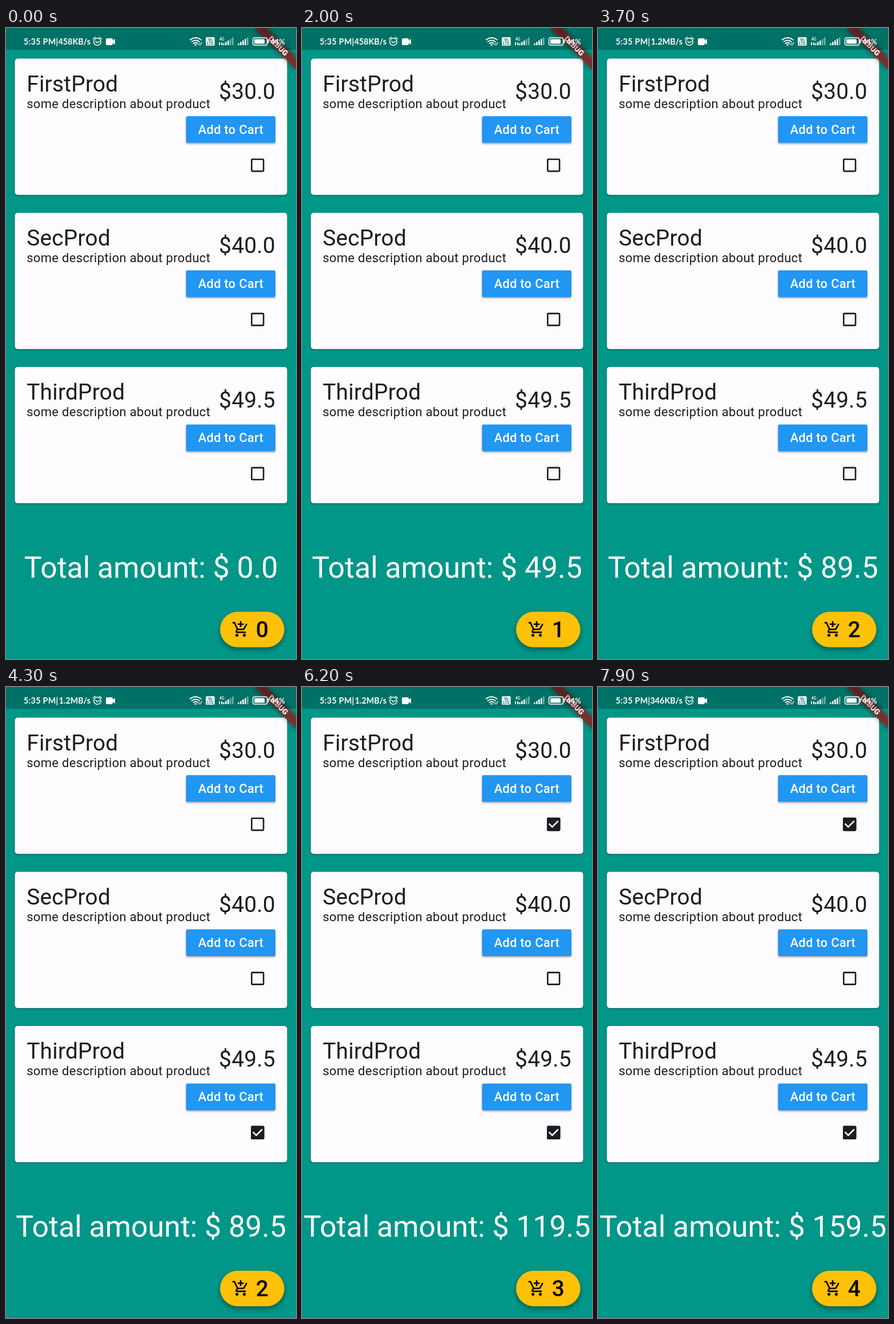
Recreate the animation shown at these times as an HTML page. Size 508 by 1102 pixels, loop 8000 ms.

```html
<!DOCTYPE html>
<html lang="en">
<head>
<meta charset="utf-8">
<title>Shopping cart</title>
<style>
  html, body { margin: 0; width: 100%; height: 100%; overflow: hidden; background: #009688; }
  svg { display: block; width: 508px; height: 1102px; font-family: Roboto, sans-serif; }
  .card { fill: #fffcff; filter: drop-shadow(0 1px 1.2px #0007); }
  .button { fill: #2196f3; filter: drop-shadow(0 2px 1.6px #0005); }
  .ink { fill: #1c1b1f; }
  .big { font-size: 38.8px; letter-spacing: .25px; }
  .small { font-size: 22px; letter-spacing: .32px; }
  .label { font-size: 22px; font-weight: 500; letter-spacing: .25px; fill: #fff; }
  .end { text-anchor: end; }
  .mid { text-anchor: middle; }
  .line { fill: none; stroke: #fff; }
  .status { fill: #fff; font: bold 14.3px Lato, sans-serif; }
</style>
</head>
<body>
<svg viewBox="0 0 508 1102">
  <rect width="508" height="1102" fill="#009688"/>
  <g id="cards"></g>
  <text id="total" class="mid" x="254" y="960" font-size="51.74" fill="#fff"></text>

  <rect x="375" y="1019.5" width="112.5" height="62" rx="31" fill="#ffc107"
        style="filter:drop-shadow(0 4px 4px #0006)"/>
  <g transform="translate(395.5 1034.7) scale(1.294)" fill="none" stroke="#000" stroke-width="2">
    <path d="M12 1v8M8 5h8M1 3h2.6l4.3 9h7.6c.5 0 .7-.2.9-.5l3.9-7M7.5 12l-1.4 2.6c-.4.7.1 1.4.9 1.4h12"/>
    <path d="M7 20h.01M17 20h.01" stroke-width="4" stroke-linecap="round"/>
  </g>
  <text id="count" class="mid" x="448.7" y="1064" font-size="38.8" font-weight="500"></text>

  <g transform="translate(508 0) rotate(45)">
    <rect x="-51.7" y="36.2" width="103.5" height="15.5" fill="#0007" style="filter:blur(4px)"/>
    <rect x="-51.7" y="36.2" width="103.5" height="15.5" fill="#b71c1ca0"/>
    <text class="mid" y="48.6" font-size="13.2" font-weight="900" fill="#fff">DEBUG</text>
  </g>

  <rect width="508" height="38" fill="#000" opacity=".25"/>
  <g class="status">
    <text x="31" y="29" letter-spacing=".3">5:35 PM|</text>
    <text id="speed" class="end" x="148" y="29"></text>
    <path d="M175 20q0-2 2-2h8q2 0 2 2v2l4-3v10l-4-3v2q0 2-2 2h-8q-2 0-2-2z"/>
    <rect x="350" y="16" width="15.5" height="15" rx="2"/>
    <g fill="#007166" font-size="7" class="mid"><text x="357.8" y="23">Vo</text><text x="357.8" y="30">LTE</text></g>
    <text x="374" y="22" font-size="6.5">4G</text>
    <path d="M373 25h2v5h-2zM377 25h2v5h-2z"/>
    <g id="bars"></g>
    <rect x="435" y="19.5" width="18" height="8" rx="1"/>
    <path d="M458.5 20.5h2v6h-2z"/>
    <text x="463" y="28.5" font-size="13">44%</text>
  </g>
  <g class="line" stroke-width="1.5" stroke-linecap="round">
    <circle cx="160" cy="24" r="6.3"/>
    <path d="M157 23l3 3 4-3M152.5 19l4-3M163.5 16l4 3"/>
    <path d="M322.5 20.5q9.500-7 19 0M325.500 24q6.500-5 13 0M328.500 27q3.500-3 7 0" stroke-width="2"/>
    <path d="M332 29.500h.01" stroke-width="3"/>
    <path d="M337 30l2-3M340 30l3-5" stroke-width="1.200"/>
    <rect x="432.500" y="17" width="25" height="13" rx="3"/>
  </g>
</svg>
<script>
const LOOP = 8000;
const $ = id => document.getElementById(id);

const products = [
  { name: "FirstProd", price: 30, checkedAt: 4800 },
  { name: "SecProd", price: 40, checkedAt: Infinity },
  { name: "ThirdProd", price: 49.5, checkedAt: 3700 },
];
const purchases = [
  { at: 1000, item: 2 },
  { at: 2500, item: 1 },
  { at: 5900, item: 0 },
  { at: 7400, item: 1 },
];
const speeds = [[0, "458KB/s"], [3500, "1.2MB/s"], [7400, "346KB/s"]];

$("cards").innerHTML = products.map(({ name, price }, i) => `
  <g transform="translate(0 ${i * 269.3})">
    <rect class="card" x="15.5" y="53.5" width="477" height="238" rx="5"/>
    <text class="ink big" x="36.2" y="110.600">${name}</text>
    <text class="ink small" x="36.2" y="139.500">some description about product</text>
    <text class="ink big end" x="471.8" y="124">$${price.toFixed(1)}</text>
    <rect class="button" x="315.400" y="154" width="156.500" height="46.600" rx="2.600"/>
    <text class="label mid" x="393.700" y="184.600">Add to Cart</text>
    <rect x="430.300" y="229.300" width="20.800" height="20.800" rx="1.500"
          fill="none" stroke="#1c1b1f" stroke-width="2.600"/>
    <rect class="ink fill" x="429" y="228" width="23.400" height="23.400" rx="2"/>
    <path class="line tick" d="M432.500 238.600l5.800 5.800 10.500-10.500" stroke-width="2.600"
          pathLength="1" stroke-dasharray="1 2"/>
  </g>`).join("");

const signal = (x, lit) => [0, 1, 2, 3, 4].map(i =>
  `<rect x="${x + i * 4}" y="${27 - i * 2.6}" width="2.6" height="${3 + i * 2.6}" opacity="${i < lit ? 1 : .45}"/>`).join("");
$("bars").innerHTML = signal(380, 3) + signal(406, 4);

const fills = document.querySelectorAll(".fill");
const ticks = document.querySelectorAll(".tick");
const clamp = v => Math.max(0, Math.min(1, v));

function draw() {
  const t = performance.now() % LOOP;
  const bought = purchases.filter(p => p.at <= t);
  const sum = bought.reduce((total, p) => total + products[p.item].price, 0);
  $("total").textContent = `Total amount: $ ${sum.toFixed(1)}`;
  $("count").textContent = bought.length;
  $("speed").textContent = speeds.filter(([at]) => at <= t).pop()[1];

  // The box fills first, then the tick is drawn.
  products.forEach(({ checkedAt }, i) => {
    const p = clamp((t - checkedAt) / 200);
    fills[i].style.opacity = clamp(p * 2);
    ticks[i].style.opacity = p > .5 ? 1 : 0;
    ticks[i].style.strokeDashoffset = 1 - clamp(p * 2 - 1);
  });
  requestAnimationFrame(draw);
}
draw();
</script>
</body>
</html>
```
